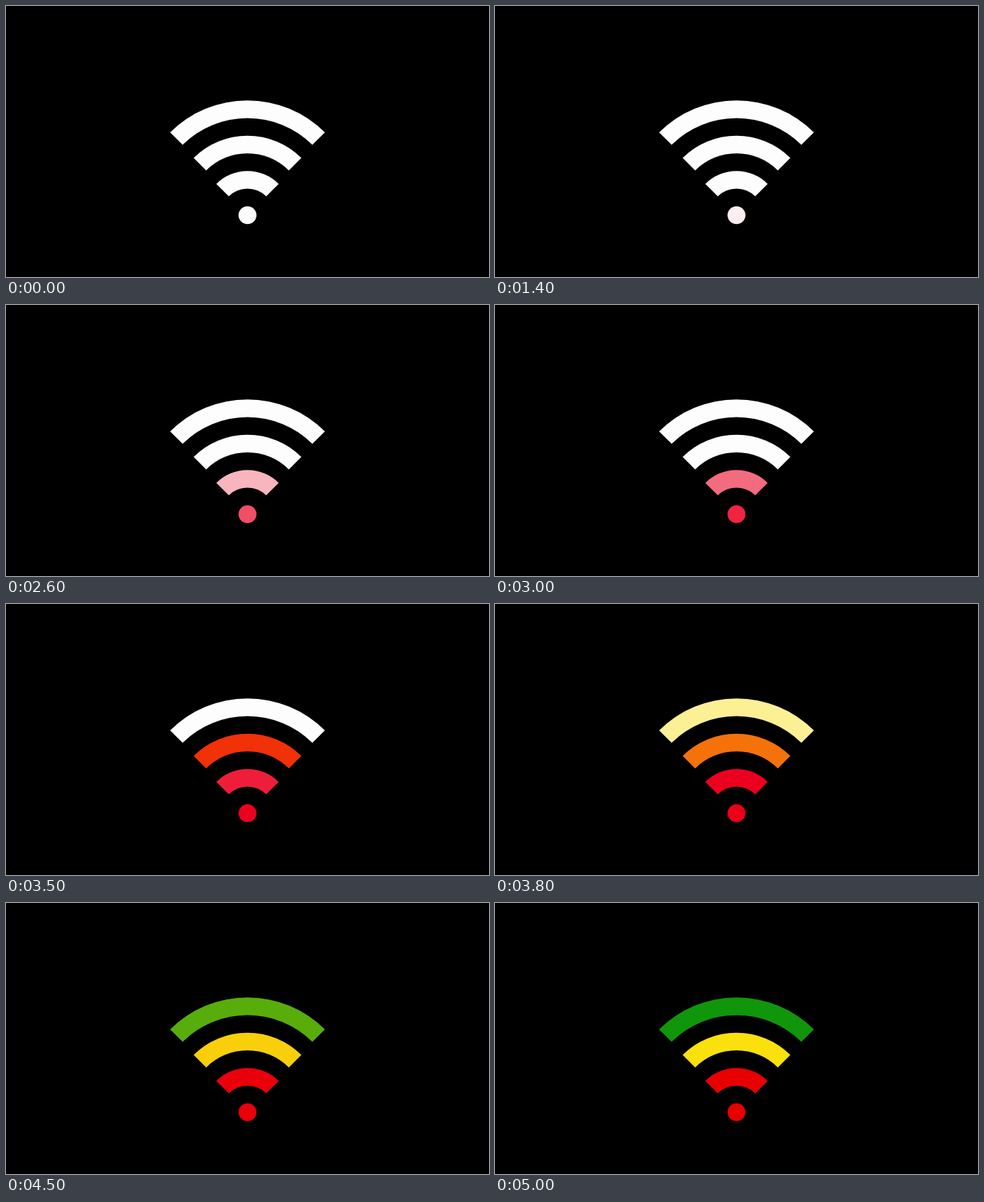
Animation of 690x388 px, one loop 5100 ms. Source, as an HTML page:

```html
<!DOCTYPE html>
<html lang="en">
<head>
<meta charset="utf-8">
<title>Wireless signal</title>
<style>
html, body { margin: 0; width: 100%; height: 100%; overflow: hidden; background: #000; }
svg { display: block; width: 100vw; height: 100vh; }
</style>
</head>
<body>
<svg viewBox="0 0 690 388">
  <rect width="690" height="388" fill="#000"/>
  <g id="signal"></g>
</svg>
<script>
const LOOP = 5100, STEP = 100, END = 5000;
const CX = 345, THICK = 25.3, BASE = 286.7, GAP = 50.5;

const WHITE = [253, 253, 253], CRIMSON = [236, 0, 32], RED = [232, 0, 0];
const ORANGE = [241, 49, 7], YELLOW = [250, 224, 12], GREEN = [16, 150, 10];

// From the dot upwards: white turns to mid between start and turn, then to last
const parts = [
  { r: 12.8, start: 1300, turn: 3500, mid: CRIMSON, last: RED, power: 1.3 },
  { r: 63, start: 2250, turn: 3800, mid: CRIMSON, last: RED, power: 1.3 },
  { r: 108.8, start: 3000, turn: 3500, mid: ORANGE, last: YELLOW, power: 2.1 },
  { r: 156.3, start: 3700, turn: 4100, mid: YELLOW, last: GREEN, power: 2 }
];

// Quarter ring opening upwards
function band(r, y) {
  const inner = r - THICK, a = r * Math.SQRT1_2, b = inner * Math.SQRT1_2;
  return `M${CX - a} ${y - a}A${r} ${r} 0 0 1 ${CX + a} ${y - a}` +
    `L${CX + b} ${y - b}A${inner} ${inner} 0 0 0 ${CX - b} ${y - b}Z`;
}

function make(tag, attrs) {
  const el = document.createElementNS('http://www.w3.org/2000/svg', tag);
  for (const key in attrs) el.setAttribute(key, attrs[key]);
  document.getElementById('signal').appendChild(el);
  return el;
}

function fade(from, to, t, t0, t1, power) {
  const x = Math.min(1, Math.max(0, (t - t0) / (t1 - t0)));
  const k = 1 - (1 - x) ** power;
  return `rgb(${from.map((v, i) => Math.round(v + (to[i] - v) * k))})`;
}

function colour({ start, turn, mid, last, power }, t) {
  return t < turn ? fade(WHITE, mid, t, start, turn, power)
                  : fade(mid, last, t, turn, END, power);
}

parts.forEach((p, i) => {
  const y = BASE - GAP * i + p.r;
  p.el = i ? make('path', { d: band(p.r, y) })
           : make('circle', { cx: CX, cy: y, r: p.r });
});

function draw(ms) {
  const t = Math.floor((ms % LOOP) / STEP) * STEP;
  for (const p of parts) p.el.setAttribute('fill', colour(p, t));
}

const begin = performance.now();
function tick() {
  draw(performance.now() - begin);
  requestAnimationFrame(tick);
}
tick();
</script>
</body>
</html>
```
